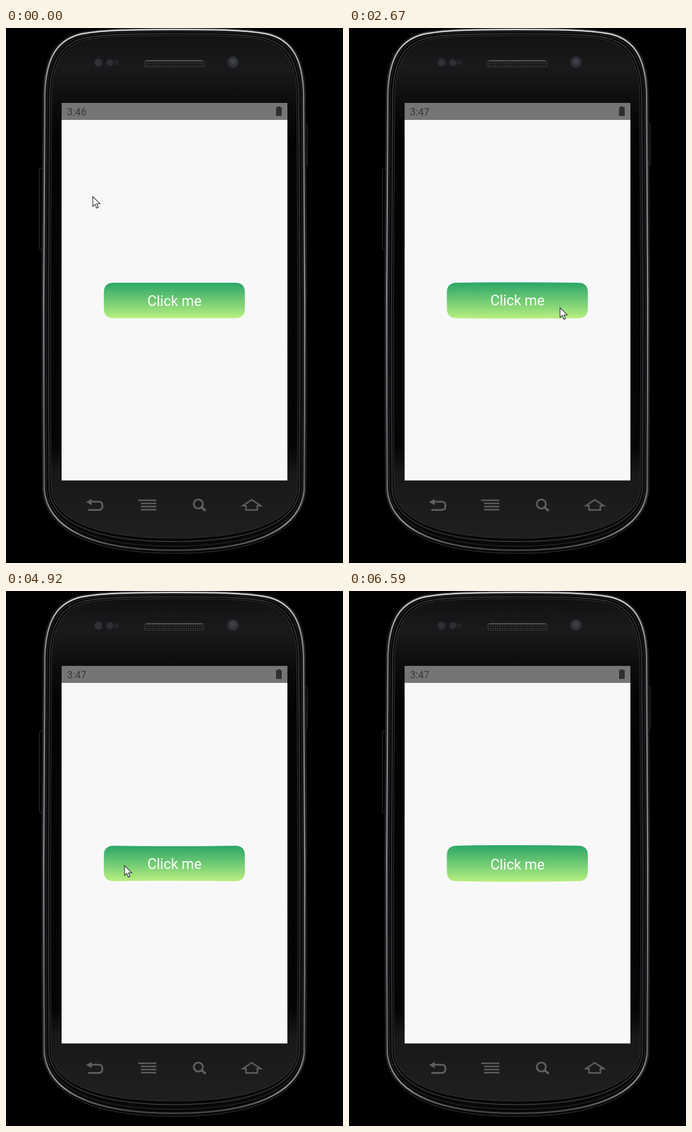
Write an HTML page that moves like this. It is 594 by 943 pixels and loops after 6680 ms.

```html
<!DOCTYPE html>
<html lang="en">
<head>
<meta charset="utf-8">
<title>Jelly button</title>
<style>
html, body { margin: 0; width: 100%; height: 100%; overflow: hidden; background: #000; }
svg { display: block; width: 100vw; height: 100vh; }
text { font-family: Roboto, sans-serif; }
</style>
</head>
<body>
<svg viewBox="0 0 594 943">
  <defs>
    <linearGradient id="green" x1="0" y1="0" x2="0" y2="1">
      <stop offset="0" stop-color="#2ba668"/>
      <stop offset=".5" stop-color="#70ca74"/>
      <stop offset="1" stop-color="#b9f080"/>
    </linearGradient>
    <linearGradient id="metal" x1="0" y1="0" x2="0" y2="1">
      <stop offset="0" stop-color="#d2d2d2"/>
      <stop offset=".05" stop-color="#a5a5a6"/>
      <stop offset=".12" stop-color="#77777b"/>
      <stop offset=".5" stop-color="#85858a"/>
      <stop offset=".86" stop-color="#606064"/>
      <stop offset=".95" stop-color="#8c8c8e"/>
      <stop offset="1" stop-color="#424244"/>
    </linearGradient>
    <linearGradient id="face" x1="0" y1="0" x2="0" y2="1">
      <stop offset="0" stop-color="#111113"/>
      <stop offset=".06" stop-color="#1a1a1c"/>
      <stop offset=".13" stop-color="#0d0d0f"/>
      <stop offset=".2" stop-color="#030304"/>
      <stop offset=".82" stop-color="#050506"/>
      <stop offset=".87" stop-color="#18181a"/>
      <stop offset="1" stop-color="#1f1f21"/>
    </linearGradient>
    <pattern id="mesh" width="4" height="4" patternUnits="userSpaceOnUse">
      <rect width="4" height="4" fill="#161617"/>
      <circle cx="2" cy="2" r="1" fill="#4a4a4b"/>
    </pattern>
  </defs>
  <rect width="594" height="943"/>
  <g fill="none" stroke="#3a3a40">
    <path d="M64 247H61Q59 247 59 250V388Q59 391 62 391H65"/>
    <path d="M528 168Q531 168 531 172V240Q531 243 528 243"/>
  </g>
  <g id="shell"></g>
  <rect x="244" y="57" width="105" height="12" rx="4" fill="url(#mesh)" stroke="#3c3c3e"/>
  <path d="M247 58H346" stroke="#606062" stroke-width="1.5"/>
  <circle cx="163" cy="61" r="7" fill="#303034"/>
  <circle cx="183" cy="61" r="6" fill="#2e2e33"/>
  <circle cx="194" cy="61" r="5" fill="#242427"/>
  <circle cx="400" cy="60" r="10" fill="#303136"/>
  <circle cx="400" cy="59" r="5" fill="#3c4048"/>
  <rect x="98" y="132" width="398" height="665.5" fill="#f8f8f9"/>
  <rect x="98" y="132" width="398" height="30" fill="#757576"/>
  <text id="clock" x="107.5" y="154" font-size="17.8" fill="#393939"></text>
  <path d="M476 139.5H479V138H483V139.5H486V155H476Z" fill="#2f2f2f"/>
  <g fill="none" stroke="#606062" stroke-width="3.2">
    <path d="M149 835H164Q170 835 170 842Q170 849.5 163 849.5H145"/>
    <path d="M141 835.5L151 830V841Z" fill="#606062" stroke="none"/>
    <path d="M233 832.5H265M238 838H265M238 843.5H265M238 849H265" stroke-width="2.6"/>
    <circle cx="339" cy="839" r="8"/>
    <path d="M345 845L352 851" stroke-width="4"/>
    <path d="M417.5 842L433 831.5L449 842H443V849.5H423V842Z" stroke-width="2.6"/>
  </g>
  <path id="button" fill="url(#green)"/>
  <text id="label" x="297" y="490" font-size="25" fill="#fff" text-anchor="middle">Click me</text>
  <path id="cursor" d="M0 0V17.3L4 13.6L6.8 20.5L9.6 19.3L6.9 12.7H12.6Z" fill="#fff" stroke="#181822" stroke-width="1.1"/>
</svg>
<script>
const LOOP = 6680, HIDE = 6250, MINUTE = 920;
const clicks = [1435, 2169, 3020, 3865, 4290, 5254, 6193];
// time, x, y of the pointer tip
const route = [
  [400, 153, 297], [1350, 215, 478], [1840, 218, 473], [2140, 365, 490],
  [2670, 372, 493], [3000, 360, 492], [3840, 269, 490], [4000, 268, 492],
  [4270, 211, 485], [4920, 209, 484], [5230, 303, 470], [5670, 305, 469],
  [6200, 322, 473]
];
const get = id => document.getElementById(id);
const button = get('button'), label = get('label'), clock = get('clock'), cursor = get('cursor');

// half of the casing as offsets from the axis, mirrored for the left side
function outline(d) {
  const w = 233 - d, t = d * .9, b = 926 - d * 1.8;
  const right = [
    [0, t], [80, t], [133, t + 1], [168 - d * .5, t + 8.5],
    [208 - d * .8, t + 19], [w - 4, t + 48], [w - 2, 115],
    [w - 1, 240], [w, 360], [w, 480],
    [w, 600], [w, 700], [w - 1, 815],
    [w - 7, 878 - d], [w - 70, b], [0, b]
  ];
  const left = right.map(([x, y]) => [-x, y]).reverse().slice(1);
  const [start, ...rest] = right.concat(left).map(([x, y]) => `${296.5 + x} ${y}`);
  return `M${start}C${rest.join(' ')}Z`;
}

// inset, line colour, line width, fill
get('shell').innerHTML = [
  [0, '#38383d', 1, '#08080a'],
  [3, 'url(#metal)', 2.8, 'none'],
  [7, '#252527', 1.5, 'none'],
  [11.5, '#414143', 1.4, '#070708'],
  [15, '#2f2f32', 1.2, 'url(#face)']
].map(([d, line, width, fill]) =>
  `<path d="${outline(d)}" fill="${fill}" stroke="${line}" stroke-width="${width}"/>`).join('');

function pointer(t) {
  const i = route.findIndex(p => p[0] > t);
  if (i < 1) return i ? route[route.length - 1].slice(1) : route[0].slice(1);
  const [a, b] = [route[i - 1], route[i]];
  const k = (t - a[0]) / (b[0] - a[0]), e = k * k * (3 - 2 * k);
  return [1, 2].map(n => a[n] + (b[n] - a[n]) * e);
}

// damped swing: the edges bulge a quarter turn behind the text
function wobble(t) {
  const start = clicks.filter(c => c <= t).pop();
  if (start === undefined) return [0, 0];
  const age = t - start, angle = age * Math.PI / 180;
  const size = 6.2 * Math.exp(-age / 320) * Math.min(1, age / 70);
  return [size * Math.sin(angle), size * Math.cos(angle)];
}

function draw(t) {
  const [bulge, sink] = wobble(t);
  const top = 449 - 2 * bulge, low = 511.5 + 2 * bulge;
  button.setAttribute('d', `M190 449Q297 ${top} 404 449Q421 449 421 466V494.5` +
    `Q421 511.5 404 511.5Q297 ${low} 190 511.5Q172.5 511.5 172.5 494.5V466Q172.5 449 190 449Z`);
  label.setAttribute('y', 490 + sink);
  clock.textContent = t < MINUTE ? '3:46' : '3:47';
  const [x, y] = pointer(t);
  cursor.setAttribute('transform', `translate(${x} ${y})`);
  cursor.setAttribute('visibility', t < HIDE ? 'visible' : 'hidden');
}

// twelve pictures per second, on a 10 ms clock
function tick() {
  const step = Math.floor(Math.floor(performance.now() % LOOP / 10) * 3 / 25);
  draw(Math.ceil(step * 25 / 3) * 10);
  requestAnimationFrame(tick);
}
tick();
</script>
</body>
</html>
```
